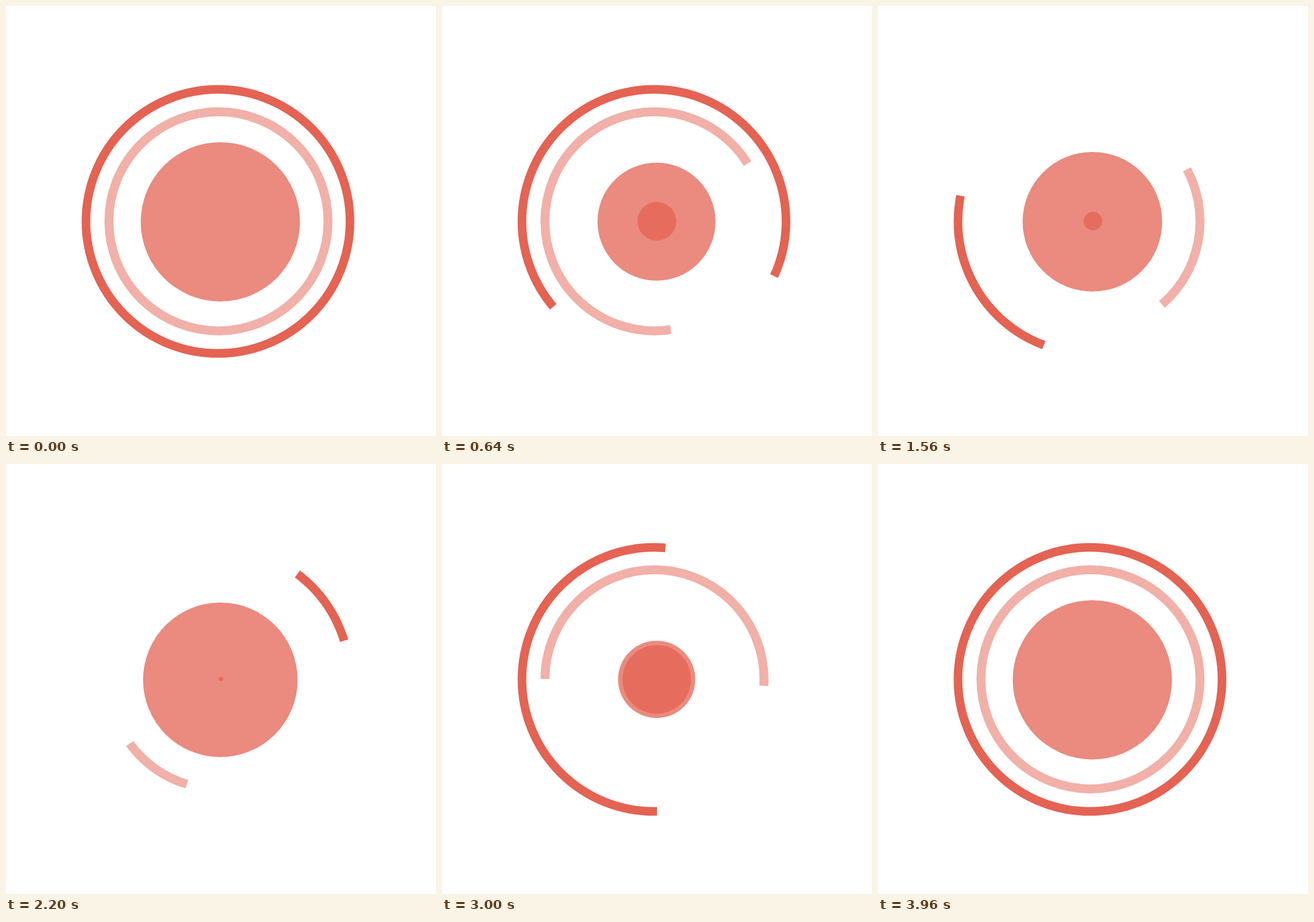
These frames come from a looping animation (748x748 px, 4000 ms). An HTML page with a canvas:

```html
<!DOCTYPE html>
<html lang="en">
<head>
<meta charset="utf-8">
<title>Pulsing rings</title>
<style>
  html, body { margin: 0; width: 100%; height: 100%; overflow: hidden; background: #fff; }
  canvas { display: block; width: 748px; height: 748px; }
</style>
</head>
<body>
<canvas id="stage" width="748" height="748"></canvas>
<script>
const ctx = document.getElementById('stage').getContext('2d');
const LOOP = 4000, HALF = 2000, STEP = 40, MID = 374;

const rings = [
  { x: 368.75, y: 374.7, r: 229.65, width: 15, alpha: 1, turn: 360 },
  { x: 369.6, y: 374.6, r: 190.55, width: 15.5, alpha: 0.5, turn: 180 }
];

// Radius keys: [time, radius]; dx and dy are the drift per unit of radius.
const discs = [
  { dx: -0.0085, dy: 0.0105,
    keys: [[0, 138.5], [500, 99.8], [2400, 138.5], [3000, 67.2], [3935, 138.5], [LOOP, 138.5]] },
  { dx: -0.0065, dy: 0.0115,
    keys: [[0, 0], [500, 36.4], [2400, 0], [3000, 59.7], [3740, 0], [LOOP, 0]] }
];

const radians = degrees => (degrees - 90) * Math.PI / 180;

function valueAt(keys, t) {
  const i = Math.max(1, keys.findIndex(key => key[0] >= t));
  const [t0, v0] = keys[i - 1], [t1, v1] = keys[i];
  return v0 + (v1 - v0) * (t - t0) / (t1 - t0);
}

// The first half wipes the ring away from its tail, the second grows its head.
function drawRing(ring, t) {
  const turned = ring.turn * t / HALF;
  const erasing = t < HALF;
  const tail = turned + (erasing ? 360 * t / HALF : 0);
  const length = erasing
    ? 360 * (1 - t / HALF)
    : Math.min(360, 360 * (t - HALF) / (HALF - STEP));
  if (length <= 0) return;

  ctx.save();
  if (length < 360) {
    ctx.beginPath();
    ctx.moveTo(MID, MID);
    ctx.arc(MID, MID, 400, radians(tail), radians(tail + length));
    ctx.closePath();
    ctx.clip();
  }
  ctx.globalAlpha = ring.alpha;
  ctx.lineWidth = ring.width;
  ctx.beginPath();
  ctx.arc(ring.x, ring.y, ring.r, 0, Math.PI * 2);
  ctx.stroke();
  ctx.restore();
}

function drawDisc({ dx, dy, keys }, t) {
  const r = valueAt(keys, t);
  ctx.globalAlpha = 0.75;
  ctx.beginPath();
  ctx.arc(MID + dx * r, MID + dy * r, r, 0, Math.PI * 2);
  ctx.fill();
  ctx.globalAlpha = 1;
}

function draw() {
  // A small lead keeps clock jitter from landing on the previous step.
  const t = Math.floor((performance.now() + 12) / STEP) * STEP % LOOP;
  ctx.clearRect(0, 0, 748, 748);
  ctx.fillStyle = ctx.strokeStyle = '#e46353';
  rings.forEach(ring => drawRing(ring, t));
  discs.forEach(disc => drawDisc(disc, t));
  requestAnimationFrame(draw);
}

draw();
</script>
</body>
</html>
```
